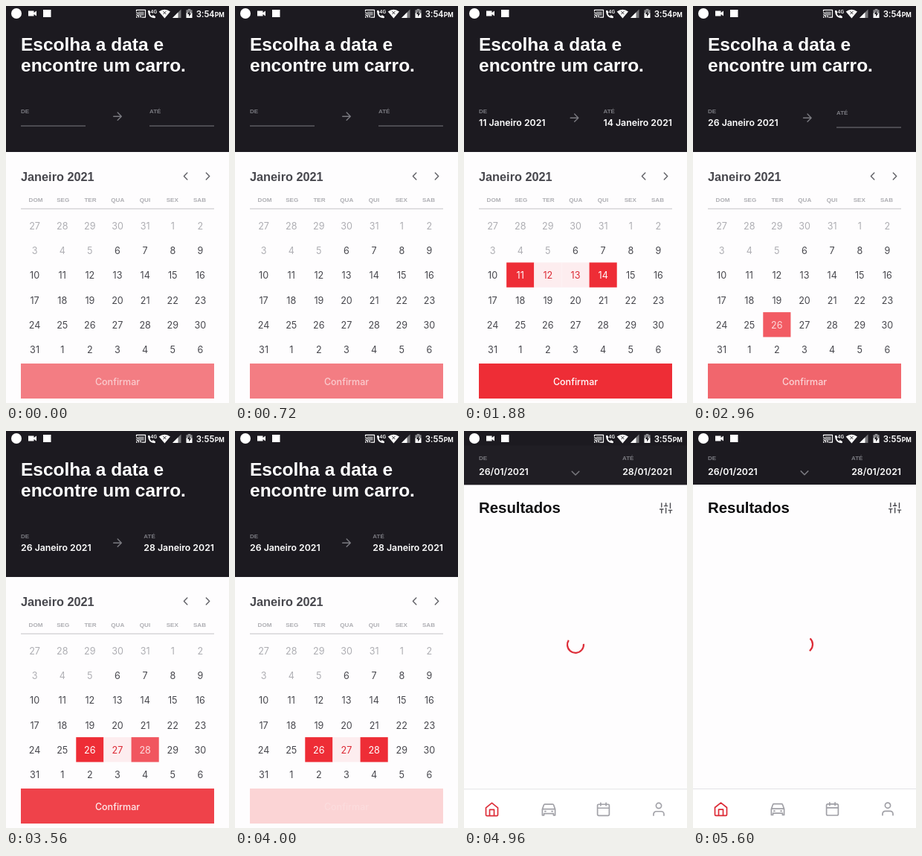
An HTML page with a canvas for the animation above (5640 ms loop, 300 by 533 pixels).

```html
<!DOCTYPE html>
<html lang="pt">
<head>
<meta charset="utf-8">
<title>Agendamento</title>
<style>
html, body { margin: 0; width: 100%; height: 100%; overflow: hidden; background: #fff; }
canvas { display: block; width: 300px; height: 533px; }
</style>
</head>
<body>
<canvas id="stage"></canvas>
<script>
const W = 300, H = 533, LOOP = 5640;
const canvas = document.getElementById('stage');
const ctx = canvas.getContext('2d');
const ratio = window.devicePixelRatio || 1;
canvas.width = W * ratio;
canvas.height = H * ratio;

const DARK = '#1c1a20', WHITE = '#fff', PAGE = '#fefdfe', CARD = '#f2f2f2';
const RED = '#ee2d36', ACCENT = '#dc2a35', PALE = '#fdedef';
const INK = '#47474d', GREY = '#aeaeb3', DIM = '#7a7a80', ICON = '#a0a0a6';
const SANS = '"Liberation Sans", Arial, sans-serif';
const INTER = 'Inter, sans-serif';
const LABEL = 'bold 8px ' + SANS, DATE = '600 12.3px ' + INTER;
const OFF = 0.61;          // opacity of a disabled button

const SELECT = [1245, 1625, 2805, 3400];
const PRESSES = { 11: [1110, SELECT[0]], 14: [1490, SELECT[1]], 26: [2670, SELECT[2]], 28: [3260, SELECT[3]] };
const BUTTON = [[SELECT[1], 250, 1], [SELECT[2], 250, OFF], [SELECT[3], 250, 1], [3830, 150, 0.2], [4690, 250, OFF]];
const CLOCK = 3200, OPEN = 4738, SPIN = 4660, LOADING = 4830;

const clamp = x => Math.min(1, Math.max(0, x));
const mix = (a, b, p) => a + (b - a) * p;
const inOut = x => x < 0.5 ? 2 * x * x : 1 - 2 * (1 - x) * (1 - x);

// Value after a list of [start, duration, target] tweens.
function track(t, value, keys) {
  keys.forEach(([start, span, to], i) => {
    if (t < start) return;
    const end = keys[i + 1] ? Math.min(t, keys[i + 1][0]) : t;
    value = mix(value, to, inOut(clamp((end - start) / span)));
  });
  return value;
}

// Ease curve with control points (x1, 0) and (x2, 1).
function bezier(x1, x2, x) {
  let lo = 0, hi = 1, u = 0.5;
  for (let i = 0; i < 20; i++) {
    u = (lo + hi) / 2;
    const bx = 3 * x1 * u * (1 - u) ** 2 + 3 * x2 * u * u * (1 - u) + u ** 3;
    if (bx < x) lo = u; else hi = u;
  }
  return 3 * u * u * (1 - u) + u ** 3;
}

function rect(x, y, w, h, color) {
  ctx.fillStyle = color;
  ctx.fillRect(x, y, w, h);
}

function text(str, x, y, font, color, align = 'left') {
  ctx.font = font;
  ctx.fillStyle = color;
  ctx.textAlign = align;
  ctx.fillText(str, x, y);
}

function stroke(d, x, y, scale, color, width) {
  ctx.save();
  ctx.translate(x, y);
  ctx.scale(scale, scale);
  ctx.strokeStyle = color;
  ctx.lineWidth = width / scale;
  ctx.lineCap = ctx.lineJoin = 'round';
  ctx.stroke(new Path2D(d));
  ctx.restore();
}

function shape(d, color) {
  ctx.fillStyle = color;
  ctx.fill(new Path2D(d));
}

function statusBar(t) {
  shape('M7 10a7 7 0 1 0 14 0a7 7 0 1 0 -14 0', WHITE);
  shape('M30 6.5h7.5v2.4l3.5-2.4v7l-3.5-2.4v2.4h-7.5z', WHITE);
  rect(50, 5, 10.5, 10, WHITE);
  stroke('M175.5 7V5.3h12v9.8h-4.5M175.5 9.2a6 6 0 0 1 5.8 5.9M175.5 11.8a3.4 3.4 0 0 1 3.2 3.3', 0, 0, 1, WHITE, 1.2);
  rect(175, 14, 1.6, 1.6, WHITE);
  rect(178, 7.4, 7.6, 5.4, '#8b8b8e');
  stroke('M192 7.2c.2 4.6 3.2 7.8 7.8 8.2', 0, 0, 1, WHITE, 1.8);
  stroke('M192.3 7l.8 1.8M197.8 13.4l2 1.4', 0, 0, 1, WHITE, 2.3);
  text('4G', 194.6, 9.6, '500 6.8px Roboto, sans-serif', WHITE);
  shape('M205.7 7.6Q213.4 1.8 221 7.6L213.4 16.4z', WHITE);
  stroke('M211.6 7.3l3.6 3.6M215.2 7.3l-3.6 3.6', 0, 0, 1, DARK, 0.9);
  shape('M224 16L235.5 4.6V16z', '#77777a');
  shape('M224 16L231.5 8.6V16z', WHITE);
  rect(244.7, 4, 3.6, 1.5, '#9c9c9f');
  rect(242.5, 5.3, 8, 4, '#8c8c8f');
  rect(242.5, 9.3, 8, 6.7, WHITE);
  shape('M247 6.5l-3 4.6h2.1v3.5l3-4.7h-2.1z', DARK);
  text(t < CLOCK ? '3:54' : '3:55', 256, 14.6, '500 12.4px Roboto, sans-serif', WHITE);
  text('PM', 280.8, 14.6, '600 8.6px Roboto, sans-serif', WHITE);
}

function periodHeader(picks) {
  const [from, to] = picks;
  const y = from ? 2 : 0;
  const name = d => d + ' Janeiro 2021';
  ctx.font = DATE;
  const wide = d => d ? ctx.measureText(name(d)).width : 87;
  const right = 280 - wide(to), middle = (20 + wide(from) + right) / 2;
  text('DE', 20, 144, LABEL, DIM);
  if (from) text(name(from), 20, 160.5, DATE, WHITE);
  else rect(20, 160.5, 87, 1, DIM);
  text('ATÉ', right, to ? 144 : 144 + y, LABEL, DIM);
  if (to) text(name(to), right, 160.5, DATE, WHITE);
  else rect(right, 160.5 + y, 87, 1, DIM);
  stroke('M-5.3 0H5.3M.2-5.1L5.3 0L.2 5.1', middle, 148.2 + y, 1, DIM, 1.4);
}

function calendar(t, picks) {
  text('Janeiro 2021', 20, 235, 'bold 16.3px ' + SANS, INK);
  stroke('M2.2-4.5L-2.2 0L2.2 4.5', 241.6, 228.5, 1, '#606066', 1.4);
  stroke('M-2.2-4.5L2.2 0L-2.2 4.5', 271.5, 228.5, 1, '#606066', 1.4);
  ['DOM', 'SEG', 'TER', 'QUA', 'QUI', 'SEX', 'SAB'].forEach((d, i) =>
    text(d, 40 + 36.75 * i, 262.7, 'bold 8.1px ' + SANS, GREY, 'center'));
  rect(20, 271.7, 260, 1, '#c3c3c7');

  const cw = 260 / 7, ch = 33.35;
  for (let i = 0; i < 42; i++) {
    const day = i - 4;
    const x = 20 + cw * (i % 7), y = 277.7 + ch * Math.floor(i / 7);
    const edge = picks.includes(day), inside = day > picks[0] && day < picks[1];
    const press = PRESSES[day];
    ctx.globalAlpha = press ? track(t, 1, [[press[0], 150, 0.2], [press[1], 250, 1]]) : 1;
    if (edge || inside) rect(x, y, cw, ch, edge ? RED : PALE);
    const color = edge ? WHITE : inside ? ACCENT : day < 6 ? GREY : INK;
    const shown = day < 1 ? day + 31 : day > 31 ? day - 31 : day;
    text(shown, x + cw / 2, y + 21.8, '400 12.6px ' + INTER, color, 'center');
  }
  ctx.globalAlpha = 1;
}

function schedule(t) {
  const stage = SELECT.filter(s => t >= s).length;
  const picks = [[], [11], [11, 14], [26], [26, 28]][stage];
  rect(0, 0, W, 196, DARK);
  const title = 'bold 24.5px ' + SANS;
  text('Escolha a data e', 20, 60, title, WHITE);
  text('encontre um carro.', 20, 88, title, WHITE);
  periodHeader(picks);
  calendar(t, picks);
  ctx.globalAlpha = track(t, OFF, BUTTON);
  rect(20, 480, 260, 47, RED);
  text('Confirmar', 150, 508.5, '500 12.5px ' + INTER, WHITE, 'center');
  ctx.globalAlpha = 1;
}

function spinner(t) {
  const ms = t - SPIN, p = clamp(ms / 1333);
  const head = bezier(0.2, 0.1, clamp(p * 2)) * 0.75;
  const tail = p < 0.5 ? 0 : bezier(0.4, 0.2, p * 2 - 1) * 0.75;
  const turn = ms * 0.162 + p * 90 - 74;
  const rad = f => (f * 360 + turn) * Math.PI / 180;
  ctx.beginPath();
  ctx.arc(150, 286.5, 11, rad(tail), rad(Math.max(head, tail + 0.02)));
  ctx.strokeStyle = ACCENT;
  ctx.lineWidth = 2.2;
  ctx.lineCap = 'butt';
  ctx.stroke();
}

function tabs() {
  rect(0, 480, W, 53, WHITE);
  rect(0, 480, W, 1, '#e3e3e6');
  stroke('M-8-2.2L0-8.6L8-2.2V7.2a1.4 1.4 0 0 1-1.4 1.4H-6.6A1.4 1.4 0 0 1-8 7.2zM-3 8.4V.4H3V8.4', 37.5, 507.7, 1, ACCENT, 1.7);
  stroke('M-8.6 7.5V-.5L-6.6-6.3Q-6.3-7.3-5.3-7.3H5.3Q6.3-7.3 6.6-6.3L8.6-.5V7.5H6.4V5.2H-6.4V7.5zM-8.4-.8H8.4M-5.2 2.2h1.2M4 2.2h1.2', 114, 508, 1, ICON, 1.7);
  stroke('M-6.4-6.6H6.4A1.5 1.5 0 0 1 7.9-5.1V7A1.5 1.5 0 0 1 6.4 8.5H-6.4A1.5 1.5 0 0 1-7.9 7V-5.1A1.5 1.5 0 0 1-6.4-6.6zM-7.9-1.6H7.9M-3.6-8.6v3.6M3.6-8.6v3.6', 187.5, 507.5, 1, ICON, 1.7);
  stroke('M-7 8.2V6.5a3.6 3.6 0 0 1 3.6-3.6H3.4a3.6 3.6 0 0 1 3.6 3.6V8.2M-3.6-4.8a3.6 3.6 0 1 0 7.2 0a3.6 3.6 0 1 0-7.2 0', 262, 507.5, 1, ICON, 1.7);
}

// The incoming page rises while each of its layers fades in.
function results(t) {
  const p = 1 - (1 - clamp((t - OPEN) / 350)) ** 5;
  const fade = p < 0.5 ? p / 2 : p < 0.9 ? mix(0.25, 0.7, (p - 0.5) / 0.4) : mix(0.7, 1, (p - 0.9) * 10);
  ctx.save();
  ctx.translate(0, 52 * (1 - p));
  ctx.globalAlpha = fade;
  rect(0, 0, W, H, CARD);
  rect(0, 0, W, H, PAGE);
  rect(0, 0, W, 72, DARK);
  text('DE', 20, 39, LABEL, DIM);
  text('ATÉ', 213, 39, LABEL, DIM);
  text('26/01/2021', 20, 58.5, DATE, WHITE);
  text('28/01/2021', 280, 58.5, DATE, WHITE, 'right');
  stroke('M-4.8-2.4L0 2.4L4.8-2.4', 150, 56.3, 1, DIM, 1.5);
  text('Resultados', 20, 110, 'bold 20.4px ' + SANS, '#0c0c0e');
  stroke('M4 21v-7M4 10V3M12 21v-9M12 8V3M20 21v-5M20 12V3M1 14h6M9 8h6M17 16h6', 262.9, 94.4, 0.73, INK, 1.4);
  if (t >= LOADING) spinner(t);
  tabs();
  ctx.restore();
}

function draw(now) {
  const t = now % LOOP;
  ctx.setTransform(ratio, 0, 0, ratio, 0, 0);
  ctx.globalAlpha = 1;
  rect(0, 0, W, H, PAGE);
  schedule(t);
  if (t >= OPEN) results(t);
  rect(0, 0, W, 19.5, DARK);
  statusBar(t);
}

let begin;
function tick(now) {
  if (begin === undefined) begin = now;
  draw(now - begin);
  requestAnimationFrame(tick);
}
draw(0);
requestAnimationFrame(tick);
</script>
</body>
</html>
```
